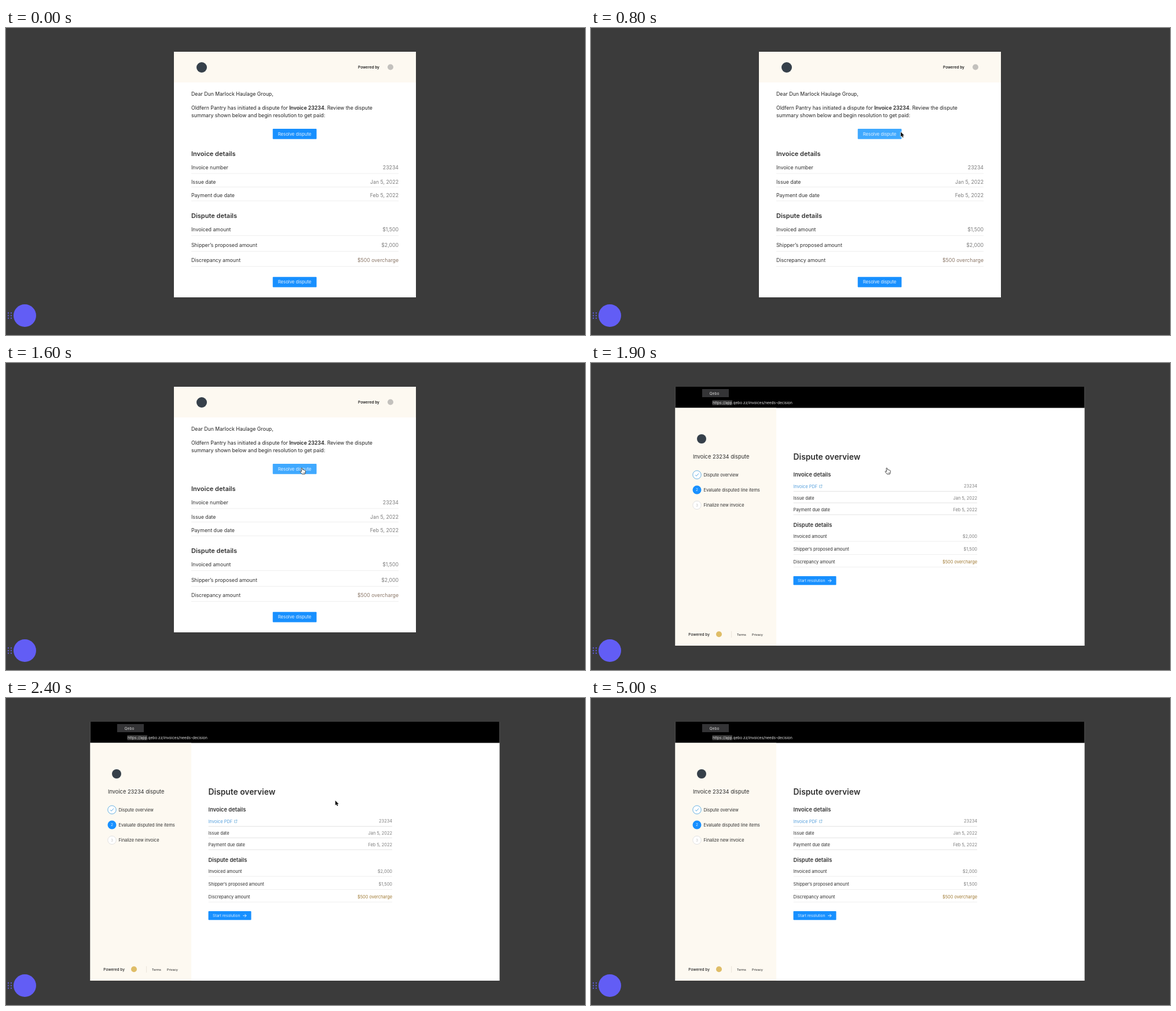
Write an HTML page with a canvas that moves like this. It is 1000 px wide and 530 px high and loops after 8 s.

```html
<!DOCTYPE html>
<html lang="en">
<head>
<meta charset="utf-8">
<title>Invoice dispute</title>
<style>
html, body { margin: 0; width: 100%; height: 100%; overflow: hidden; background: #3b3b3b; }
canvas { display: block; width: 1000px; height: 530px; }
</style>
</head>
<body>
<canvas id="stage"></canvas>
<script>
const W = 1000, H = 530, DURATION = 8000;
const BLUE = '#1890ff', HOVER = '#40a9ff', CREAM = '#fdf9f1', INK = '#303030', GREY = '#7c7c7c';
const canvas = document.getElementById('stage');
const ctx = canvas.getContext('2d');
const dpr = window.devicePixelRatio || 1;
canvas.width = W * dpr;
canvas.height = H * dpr;

function rect(x, y, w, h, color) {
  ctx.fillStyle = color;
  ctx.fillRect(x, y, w, h);
}

function rounded(x, y, w, h, r, color) {
  ctx.fillStyle = color;
  ctx.beginPath();
  ctx.roundRect(x, y, w, h, r);
  ctx.fill();
}

function disc(x, y, r, color) {
  ctx.fillStyle = color;
  ctx.beginPath();
  ctx.arc(x, y, r, 0, 7);
  ctx.fill();
}

function ring(x, y, r, color) {
  ctx.strokeStyle = color;
  ctx.lineWidth = 0.9;
  ctx.beginPath();
  ctx.arc(x, y, r, 0, 7);
  ctx.stroke();
}

function strokePath(d, color, width = 0.9) {
  ctx.strokeStyle = color;
  ctx.lineWidth = width;
  ctx.stroke(new Path2D(d));
}

// y is the middle of the capitals; returns the advance width
function text(str, x, y, size, color = INK, weight = 400, align = 'left') {
  ctx.font = `${weight} ${size}px Inter, "Open Sans", sans-serif`;
  ctx.textAlign = align;
  ctx.fillStyle = color;
  ctx.fillText(str, x, y + size * 0.36);
  return ctx.measureText(str).width;
}

function row(label, value, y, lineY, left, right, size, color = GREY, rule = '#ececec') {
  if (label) text(label, left, y, size);
  text(value, right, y, size, color, 400, 'right');
  rect(left, lineY, right - left, 0.8, rule);
}

function button(y, hover) {
  rounded(460.7, y, 75.7, 17.8, 1, hover ? HOVER : BLUE);
  text('Resolve dispute', 498.5, y + 9, 7.7, '#e4f2ff', 400, 'center');
}

function drawEmail(hover) {
  rect(290, 41, 418, 424, '#fff');
  rect(290, 41, 418, 53, CREAM);
  disc(338, 68, 9, '#36404a');
  text('Powered by', 608, 67.5, 6.5, '#222', 600);
  disc(664, 67.5, 5, '#c3c1bd');

  const size = 8.75;
  text('Dear Dun Marlock Haulage Group,', 320, 114, size, '#222');
  let x = 320;
  x += text('Oldfern Pantry has initiated a dispute for ', x, 138.3, size, '#222');
  x += text('Invoice 23234', x, 138.3, size, '#222', 600);
  text('. Review the dispute', x, 138.3, size, '#222');
  text('summary shown below and begin resolution to get paid:', 320, 150.5, size, '#222');
  button(174, hover);

  const line = (label, value, y, lineY, color) => row(label, value, y, lineY, 320, 678, size, color);
  text('Invoice details', 320, 217, 11, INK, 600);
  line('Invoice number', '23234', 240.5, 250.7);
  line('Issue date', 'Jan 5, 2022', 265.5, 274.2);
  line('Payment due date', 'Feb 5, 2022', 289.3, 298);
  text('Dispute details', 320, 324.5, 11, INK, 600);
  line('Invoiced amount', '$1,500', 348, 358);
  line('Shipper’s proposed amount', '$2,000', 374.5, 385);
  line('Discrepancy amount', '$500 overcharge', 401, 411, '#8b7768');
  button(429.7, false);
}

function drawSidebar() {
  rect(145.5, 77.5, 174.5, 410.5, CREAM);
  disc(191, 131, 8, '#36404a');
  text('Invoice 23234 dispute', 176, 162, 9.25, '#2c2c2c');

  disc(183, 193, 7.2, '#fff');
  ring(183, 193, 7.2, '#56a9e0');
  strokePath('M180 193.2l2 2 4-4.6', '#4aa3e0');
  text('Dispute overview', 194.5, 193.3, 7.4);
  disc(183, 219, 7.5, BLUE);
  text('2', 183, 219, 6.4, '#d9edff', 400, 'center');
  text('Evaluate disputed line items', 194.5, 219.5, 7.4);
  disc(183, 245.4, 7.2, '#fff');
  ring(183, 245.4, 7.2, '#dedede');
  text('3', 183, 245.4, 6.4, '#c2c2c2', 400, 'center');
  text('Finalize new invoice', 194.5, 245.8, 7.4);

  text('Powered by', 168.3, 468.7, 6.5, '#222', 500);
  disc(221, 468.3, 5, '#dfbd67');
  rect(242.3, 463, 0.8, 11, '#e6e1d6');
  text('Terms', 252, 468.7, 5.4, '#222');
  text('Privacy', 278, 468.7, 5.4, '#222');
}

function drawPortal() {
  rect(145.5, 41, 707, 447, '#fff');
  rect(145.5, 41, 707, 36.5, '#000');
  rect(192, 45, 46, 14, '#343436');
  text('Qebo', 213, 52.2, 6.7, '#d2d2d2', 400, 'center');
  rect(209.5, 64, 34.5, 9, '#333');
  text('https://app.qebo.zz/invoices/needs-decision', 210, 68.7, 6.5, '#e2e2e2');
  drawSidebar();

  const size = 7.4, rule = '#dedede';
  const line = (label, value, y, lineY, color, shade) => row(label, value, y, lineY, 349.6, 667, size, color, shade);
  text('Dispute overview', 349.6, 161.8, 13.8, INK, 600);
  text('Invoice details', 349.6, 192.3, 9.3, INK, 600);
  text('Invoice PDF', 349.6, 213, size, '#559fdc');
  strokePath('M396.5 211h-2v4.2h4v-2M396.4 213.2l2.4-2.6M397 210.5h2v2', '#6daed8', 0.7);
  line('', '23234', 212.5, 221, GREY, rule);
  line('Issue date', 'Jan 5, 2022', 233.3, 241.2, GREY, rule);
  line('Payment due date', 'Feb 5, 2022', 253.3, 261.5, GREY, rule);
  text('Dispute details', 349.6, 279.4, 9.3, INK, 600);
  line('Invoiced amount', '$2,000', 299.4, 307.5);
  line('Shipper’s proposed amount', '$1,500', 321.4, 330);
  line('Discrepancy amount', '$500 overcharge', 343.8, 351.8, '#a07a34');

  rounded(349.5, 368, 74, 15.3, 1, BLUE);
  text('Start resolution', 357, 375.8, 6.6, '#dceeff');
  strokePath('M409.3 375.8h5.6M412.5 373.2l2.6 2.6-2.6 2.6', '#eef7ff', 0.9);
}

function drawWidget() {
  for (const x of [4, 9]) {
    for (const y of [492, 496.5, 501]) disc(x, y, 1.2, '#5e5ad0');
  }
  disc(32.5, 496.5, 19.5, '#625df5');
}

const ARROW = new Path2D('M0 0V8.2L1.9 6.5 3.2 9.4 4.7 8.7 3.4 5.9H5.9Z');
const HAND = new Path2D('M-2.6 -4.8Q-1.5 -6.2 -.7 -4.6L0 -2Q1 -2.8 1.7 -1.7Q2.7 -2.3 3.3 -1.2Q4.5 -1.5 4.7 0L4.5 2.7 3.6 5.3H-1.2L-4.3 1.4Q-4.6 -.2 -2.9 .2L-1.9 1Z');

function drawCursor({ x, y, hand }) {
  ctx.save();
  ctx.translate(x, y);
  ctx.lineJoin = 'round';
  if (hand) {
    ctx.fillStyle = '#fff';
    ctx.fill(HAND);
    ctx.strokeStyle = '#333';
    ctx.lineWidth = 0.9;
    ctx.stroke(HAND);
    strokePath('M.3 2V4M1.8 2V4M3.2 2V4', '#555', 0.5);
  } else {
    ctx.strokeStyle = '#fff';
    ctx.lineWidth = 1.2;
    ctx.stroke(ARROW);
    ctx.fillStyle = '#111';
    ctx.fill(ARROW);
  }
  ctx.restore();
}

const easeOut = p => 1 - (1 - p) * (1 - p);

function glide(from, to, p, hand) {
  const e = easeOut(Math.min(1, p));
  return { x: from[0] + (to[0] - from[0]) * e, y: from[1] + (to[1] - from[1]) * e, hand };
}

// The pointer is sampled ten times a second
function cursorAt(t) {
  const tick = Math.floor(t / 100);
  if (tick < 5 || tick >= 50) return null;
  if (tick < 12) return glide([822, 215], [535, 179.5], (tick - 5) / 3, false);
  if (tick < 22) return glide([533, 185], [512.5, 186.5], (tick - 11) / 5, true);
  return glide([512, 182], [568.7, 177], (tick - 21) / 3, false);
}

function draw(t) {
  ctx.setTransform(dpr, 0, 0, dpr, 0, 0);
  rect(0, 0, W, H, '#3b3b3b');
  if (t < 1900) drawEmail(t >= 800);
  else drawPortal();
  drawWidget();
  const cursor = cursorAt(t);
  if (cursor) drawCursor(cursor);
}

const start = performance.now();
function frame() {
  draw((performance.now() - start) % DURATION);
  requestAnimationFrame(frame);
}
frame();
</script>
</body>
</html>
```
